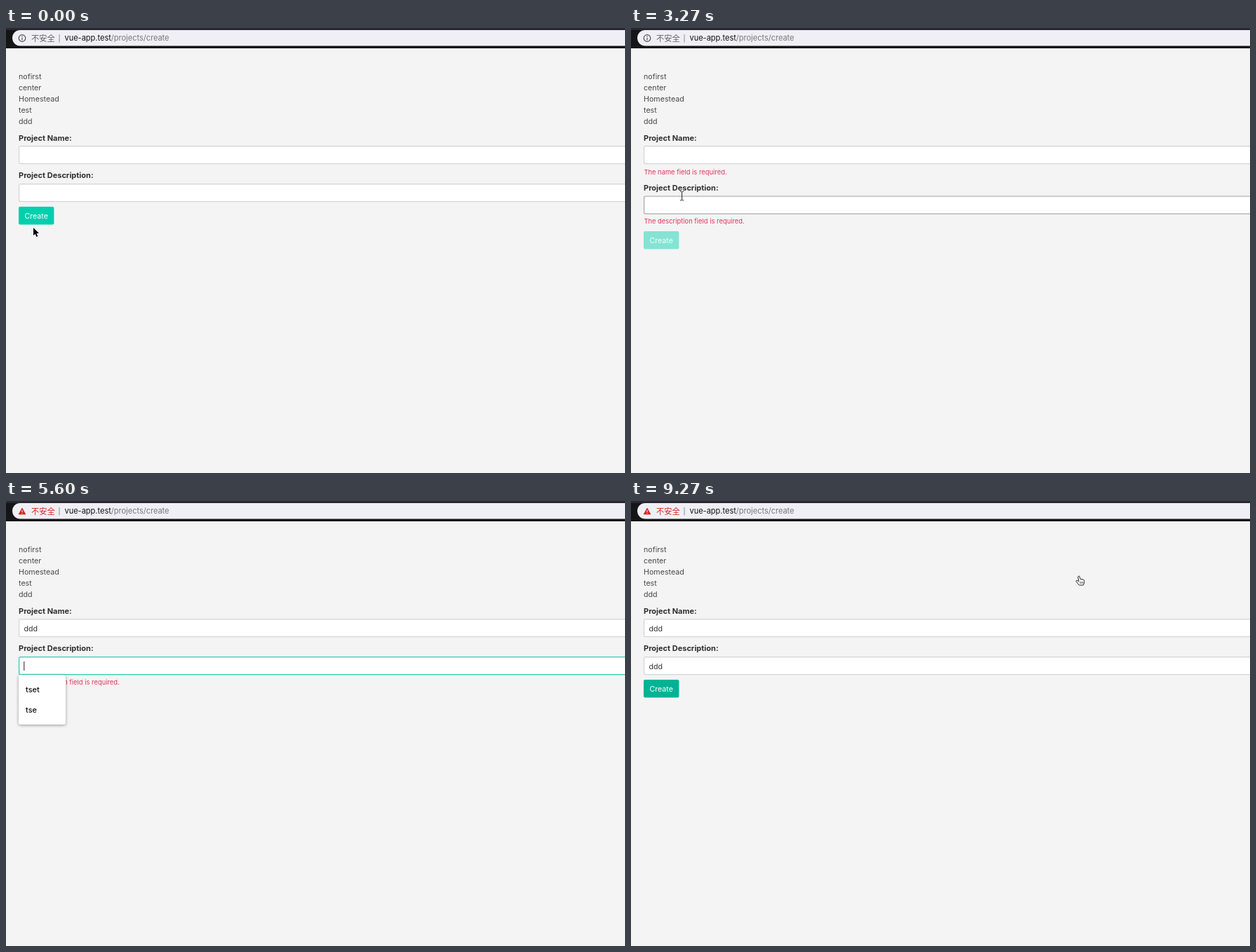
Write an HTML page that moves like this. It is 882x635 px and loops after 9340 ms.

```html
<!DOCTYPE html>
<html lang="zh">
<head>
<meta charset="utf-8">
<title>Create project</title>
<style>
  html, body { margin: 0; width: 100%; height: 100%; overflow: hidden; background: #f4f4f4; }
  svg { display: block; font: 10.7px Inter, "Noto Sans CJK SC", sans-serif; fill: #4a4a4a; }
  text { white-space: pre; }
  .label { font-weight: 700; font-size: 11px; fill: #303030; }
  .error { font-size: 9.4px; fill: #e0355f; }
  .ime { font: 12.5px "Noto Sans CJK SC", "Noto Sans CJK", Inter, sans-serif; fill: #555; }
  .item { font-size: 11px; font-weight: 500; fill: #111; }
  .panel { fill: #fff; filter: drop-shadow(0 1px 2px rgba(0,0,0,.38)); }
  .alert { fill: #fff; filter: drop-shadow(0 2px 6px rgba(0,0,0,.38)); }
</style>
</head>
<body>
<svg id="stage" width="882" height="635" viewBox="0 0 882 635"></svg>
<script>
const LOOP = 9340, STEP = 1000 / 15, ROW = 17.5;
const stage = document.getElementById('stage');
const during = (t, from, to = LOOP) => t >= from && t < to;

// Pointer path: time, x, y
const path = [
  [0, 39, 285], [330, 43, 266], [1470, 43, 266], [1800, 72, 226], [1950, 78, 199],
  [2130, 70, 220], [2270, 64, 246], [2400, 65, 236], [2670, 58, 285], [2870, 50, 308],
  [3130, 62, 280], [3400, 82, 204], [3530, 80, 182], [4800, 80, 182], [5200, 70, 236],
  [6400, 70, 236], [6800, 50.5, 263], [7670, 50.5, 263], [7870, 72, 269],
  [8400, 488, 168], [8530, 488, 168], [9000, 638, 107], [LOOP, 638, 107]
];

// Typed text: time, value
const nameKeys = [[3730, 'd'], [3870, 'd d'], [4070, 'd d d'], [4600, 'ddd']];
const descKeys = [[5800, 'dd'], [6200, 'ddd']];
const candidates = {
  'd': ['的', '到', '当', '_(:з」∠)_', 'の'],
  'd d': ['等等', '得到', '当地', '调到', '大的'],
  'd d d': ['等等等', '得到的', '当地的', '调到的', '大多的']
};

function pointerAt(t) {
  const i = Math.max(1, path.findIndex(p => p[0] > t));
  const [t0, x0, y0] = path[i - 1], [t1, x1, y1] = path[i];
  const k = (t - t0) / (t1 - t0), e = k * k * (3 - 2 * k);
  return { x: x0 + (x1 - x0) * e, y: y0 + (y1 - y0) * e };
}

const typed = (keys, t) => keys.reduce((value, [at, next]) => t >= at ? next : value, '');
const text = (x, y, value, attrs = '') => `<text x="${x}" y="${y}" ${attrs}>${value}</text>`;
const rect = (x, y, w, h, attrs) => `<rect x="${x}" y="${y}" width="${w}" height="${h}" ${attrs}/>`;
const shape = (d, attrs) => `<path d="${d}" ${attrs}/>`;
const textWidth = value => [...value].reduce((w, c) => w + (c === ' ' ? 3 : 6.65), 0);

function browserBar(warned) {
  const icon = warned
    ? shape('M23 10L28 19H18Z', 'fill="#d2261e" stroke="#d2261e" stroke-linejoin="round" stroke-width=".6"') +
      shape('M23 13V16M23 17V18', 'stroke="#fff"')
    : '<circle cx="23" cy="14.5" r="4.8" fill="none" stroke="#505055" stroke-width="1.2"/>' +
      shape('M23 11.5V13M23 14V17.5', 'stroke="#505055" stroke-width="1.2"');
  return rect(0, 0, 882, 29, 'fill="#151417"') + rect(0, 0, 882, 3, 'fill="#2b2730"') +
    rect(9, 3, 900, 22.5, 'rx="11.2" fill="#f1eff6"') + icon +
    text(36, 18.5, '不安全', `font-size="11.3" fill="${warned ? '#d2261e' : '#606065'}"`) +
    shape('M76 9V20.5', 'stroke="#8e8d93"') +
    text(83.5, 18, 'vue-app.test<tspan fill="#77767c">/projects/create</tspan>', 'font-size="11" fill="#111"');
}

function field(y, value, focused, hovered, composing) {
  const color = focused ? '#2ccdb4' : hovered ? '#a9a9a9' : '#d5d5d5';
  const end = 25.5 + textWidth(value);
  return rect(18.6, y + .6, 900, 25, `rx="2" fill="#fff" stroke="${color}" stroke-width="1.25"`) +
    (focused ? '' : shape(`M19.5 ${y + 1.7}H882`, 'stroke="#f1f1f1"')) +
    text(25.5, y + 18, value, 'fill="#363636"') +
    (composing ? shape(`M25.5 ${y + 19.5}H${end}`, 'stroke="#444"') : '') +
    (focused ? shape(`M${end + .3} ${y + 7}V${y + 20}`, 'stroke="#222"') : '');
}

function dropdown(y, width, items) {
  return rect(18, y, width, 13 + 29 * items.length, 'rx="3" class="panel"') +
    items.map((item, i) => text(28, y + 25 + 28.7 * i, item, 'class="item"')).join('');
}

function inputMethod(words) {
  let x = 22, list = '';
  words.forEach((word, i) => {
    list += text(x, 213, `${i + 1}.${word}`, `class="ime" ${i ? '' : 'style="fill:#e0622a"'}`);
    x += word.length > 3 ? 72 : 17.5 + 12.5 * word.length;
    if (i === 0 && word.length === 1) x -= 1;
  });
  const ax = x + 8;
  return rect(5, 193, ax + 11.5, 30, 'class="panel"') +
    rect(9, 193, 4, 30, 'fill="#fbeee8"') + shape('M13.5 193V223', 'stroke="#f1c9bb"') +
    shape('M5.5 197V222', 'stroke="#ccc" stroke-width="3" stroke-dasharray="3 3"') + list +
    shape(`M${ax - 4} 205l4 -3 4 3`, 'fill="none" stroke="#f3c3b5" stroke-width="1.3"') +
    shape(`M${ax - 4} 212l4 3.5 4 -3.5`, 'fill="none" stroke="#e0622a" stroke-width="1.6"');
}

function button(y, disabled, color) {
  return `<g opacity="${disabled ? .45 : 1}">` + rect(18, y, 50.4, 25.6, `rx="2" fill="${color}"`) +
    text(43.2, y + 17, 'Create', 'text-anchor="middle" fill="#fff"') + '</g>';
}

function alertBox(t) {
  const leave = Math.min(1, Math.max(0, (t - 9100) / 165));
  return `<g opacity="${1 - leave}" transform="translate(0 ${-8 * leave})">` +
    rect(317.5, 27, 356, 103, 'rx="2" class="alert"') +
    text(330, 52, 'vue-app.test 显示', 'font-size="11.7" fill="#222"') +
    text(330, 75.5, 'success', 'font-size="9.9" fill="#555"') +
    rect(610, 92, 51, 25.5, 'rx="2.5" fill="#3b7af0"') +
    text(635.5, 108.3, '确定', 'font-size="9.8" font-weight="700" text-anchor="middle" fill="#fff"') + '</g>';
}

function pointer({ x, y }, kind) {
  const drawn = {
    arrow: shape('M0 0V11.2L2.6 8.8 4.4 12.9 6.3 12 4.5 8.1H8Z',
      'fill="#000" stroke="#fff" stroke-width="1.6" paint-order="stroke"'),
    beam: shape('M-2.5 -6.5Q0 -6.5 0 -5Q0 -6.5 2.5 -6.5M0 -5V5M-2.5 6.5Q0 6.5 0 5Q0 6.5 2.5 6.5',
      'fill="none" stroke="#222"'),
    hand: shape('M-1.2 1Q0 -1 1.2 .8L2.2 4.5Q7 4.4 8 6.5L7.6 10 6.5 13H.5Q-2 10 -4 7.5Q-3.8 5.4 -1.4 7L0 8Z',
      'fill="#fff" stroke="#222" stroke-linejoin="round"') +
      shape('M2 8V11M3.8 8V11M5.6 8V11', 'stroke="#444" stroke-width=".8"')
  };
  return `<g transform="translate(${x.toFixed(1)} ${y.toFixed(1)})">${drawn[kind]}</g>`;
}

function scene(t) {
  const at = pointerAt(t);
  const nameError = during(t, 1070, 4600), descError = during(t, 1070, 5800);
  const nameFocus = during(t, 3530, 5130), descFocus = during(t, 5130, 7130);
  const descTop = 222 + nameError * ROW;
  const buttonTop = 255 + (nameError + descError) * ROW;
  const inside = (top, slack = 0) => at.y > top - slack && at.y < top + 26;
  const name = typed(nameKeys, t), words = candidates[name];
  const overName = inside(168), overDesc = during(t, 1070, 6600) && inside(descTop, 4);
  const color = during(t, 7270) || during(t, 1000, 1070) ? '#00b394'
    : !descError && t < 7270 && at.x < 69 && inside(buttonTop) ? '#00c3a3' : '#00cfad';
  const hidden = during(t, 3670, 4870) || during(t, 5600, 6470);
  const overField = t < 7000 && (overName || (overDesc && at.y > descTop && t > 1530));
  const kind = t > 8600 && at.x > 610 && at.y < 117 ? 'hand' : overField ? 'beam' : 'arrow';

  return rect(0, 0, 882, 635, 'fill="#f4f4f4"') + browserBar(t >= 3670) +
    ['nofirst', 'center', 'Homestead', 'test', 'ddd'].map((p, i) => text(18, 73 + 16 * i, p)).join('') +
    text(18, 160.5, 'Project Name:', 'class="label"') +
    field(168, name, nameFocus, overName && t < 3600, words) +
    (nameError ? text(18.4, 208.5, 'The name field is required.', 'class="error"') : '') +
    text(18, descTop - 8, 'Project Description:', 'class="label"') +
    field(descTop, typed(descKeys, t), descFocus, overDesc && !hidden) +
    (descError ? text(18.4, descTop + 39.7, 'The description field is required.', 'class="error"') : '') +
    button(buttonTop, descError, color) +
    (during(t, 3590, 3660) ? dropdown(194, 92, ['ddd', 'test', 'Homestead', 'center', 'nofirst', 'dd']) : '') +
    (during(t, 5330, 5800) ? dropdown(248, 67, ['tset', 'tse']) : '') +
    (words ? inputMethod(words) : '') +
    (t >= 7530 ? alertBox(t) : '') +
    (hidden ? '' : pointer(at, kind));
}

let shown = -1;
function frame(now) {
  const index = Math.floor((now % LOOP + 4) / STEP);
  if (index !== shown) {
    shown = index;
    stage.innerHTML = scene(Math.min(index * STEP + 4, LOOP - 1));
  }
  requestAnimationFrame(frame);
}
frame(0);
</script>
</body>
</html>
```
